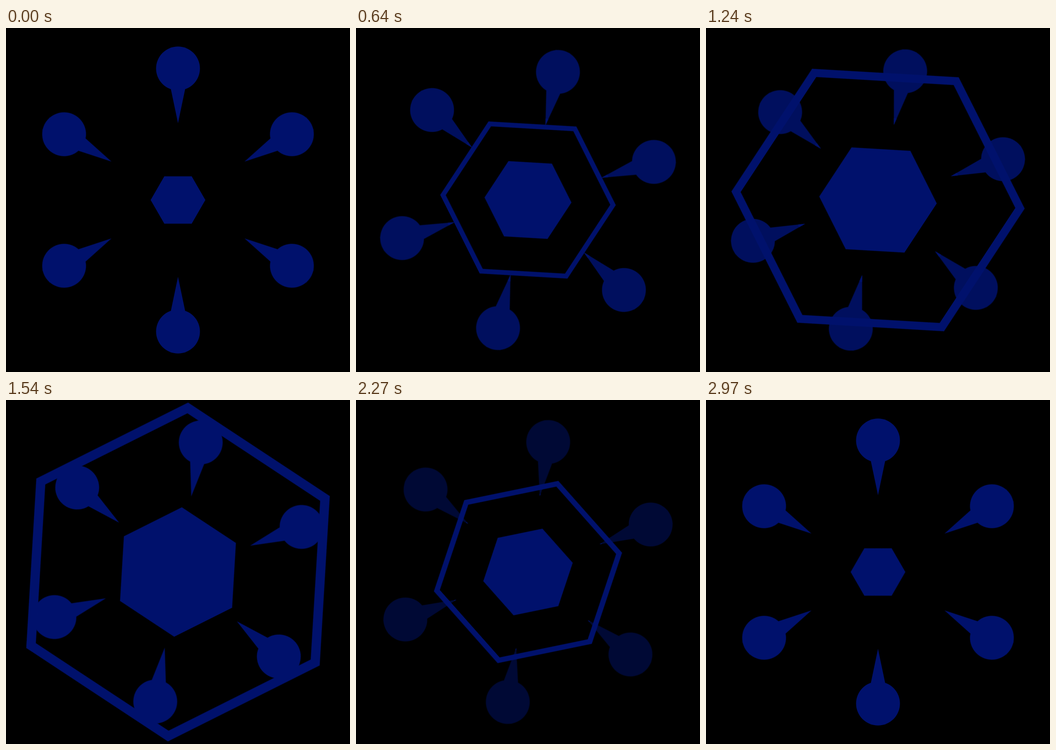
Recreate the animation shown at these times as an HTML page. Size 748 by 748 pixels, loop 3000 ms.

```html
<!DOCTYPE html>
<html lang="en">
<head>
<meta charset="utf-8">
<title>Hexagon and pins</title>
<style>
  html, body { margin: 0; width: 100%; height: 100%; overflow: hidden; background: #000; }
  svg { display: block; width: 100vw; height: 100vh; fill: #00116c; }

  .spin, .dim, .tips, .core, .ring { animation: 3s -1ms infinite; }
  .spin { animation-name: spin; }
  .dim { animation-name: dim; }
  .tips { animation-name: tips; }
  .core { --grow: 2.4; animation-name: turn; }
  .ring { --grow: 6.72; animation-name: turn; fill: none; stroke: #00116c; stroke-width: 3.07; }

  /* All motion advances 30 times a second; the last step rests until the loop restarts. */
  @keyframes turn {
    0% { transform: rotate(0deg) scale(1); animation-timing-function: steps(45); }
    50% { transform: rotate(150deg) scale(var(--grow)); animation-timing-function: steps(44); }
    98.8889%, 100% { transform: rotate(300deg) scale(1); }
  }
  @keyframes spin {
    0% { transform: rotate(0deg); animation-timing-function: steps(12); }
    13.3333% { transform: rotate(85.67deg); animation-timing-function: steps(15); }
    30% { transform: rotate(187.45deg); animation-timing-function: steps(19); }
    51.1111% { transform: rotate(309.96deg); animation-timing-function: steps(13); }
    65.5556% { transform: rotate(380deg); animation-timing-function: steps(19); }
    86.6667% { transform: rotate(483.1deg); animation-timing-function: steps(11); }
    98.8889%, 100% { transform: rotate(540deg); }
  }
  @keyframes dim {
    0% { opacity: 1; animation-timing-function: steps(12); }
    13.3333% { opacity: 1; animation-timing-function: steps(15); }
    30% { opacity: .72; animation-timing-function: steps(19); }
    51.1111% { opacity: 1; animation-timing-function: steps(13); }
    65.5556% { opacity: .25; animation-timing-function: steps(19); }
    86.6667% { opacity: .75; animation-timing-function: steps(11); }
    98.8889%, 100% { opacity: 1; }
  }
  /* The innermost part of each pin stays bright while the rest dims. */
  @keyframes tips {
    0%, 13.3333% { clip-path: circle(167px); animation-timing-function: steps(15); }
    30% { clip-path: circle(198px); animation-timing-function: steps(19); }
    51.1111% { clip-path: circle(167px); animation-timing-function: steps(13); }
    65.5556% { clip-path: circle(177px); animation-timing-function: steps(19); }
    86.6667%, 100% { clip-path: circle(167px); }
  }
</style>
</head>
<body>
<svg viewBox="-374 -374 748 748">
  <defs>
    <g id="pin">
      <circle cy="-286" r="47.7"/>
      <path d="M0-167L-17.4-250H17.4Z"/>
    </g>
    <g id="pins">
      <use href="#pin"/>
      <use href="#pin" transform="rotate(60)"/>
      <use href="#pin" transform="rotate(120)"/>
      <use href="#pin" transform="rotate(180)"/>
      <use href="#pin" transform="rotate(240)"/>
      <use href="#pin" transform="rotate(300)"/>
    </g>
  </defs>
  <g class="spin">
    <g class="dim"><use href="#pins"/></g>
    <g class="tips"><use href="#pins"/></g>
  </g>
  <path class="ring" d="M54.23 0L27.115 46.965H-27.115L-54.23 0L-27.115-46.965H27.115Z"/>
  <path class="core" d="M59.5 0L29.75 51.53H-29.75L-59.5 0L-29.75-51.53H29.75Z"/>
</svg>
</body>
</html>
```
